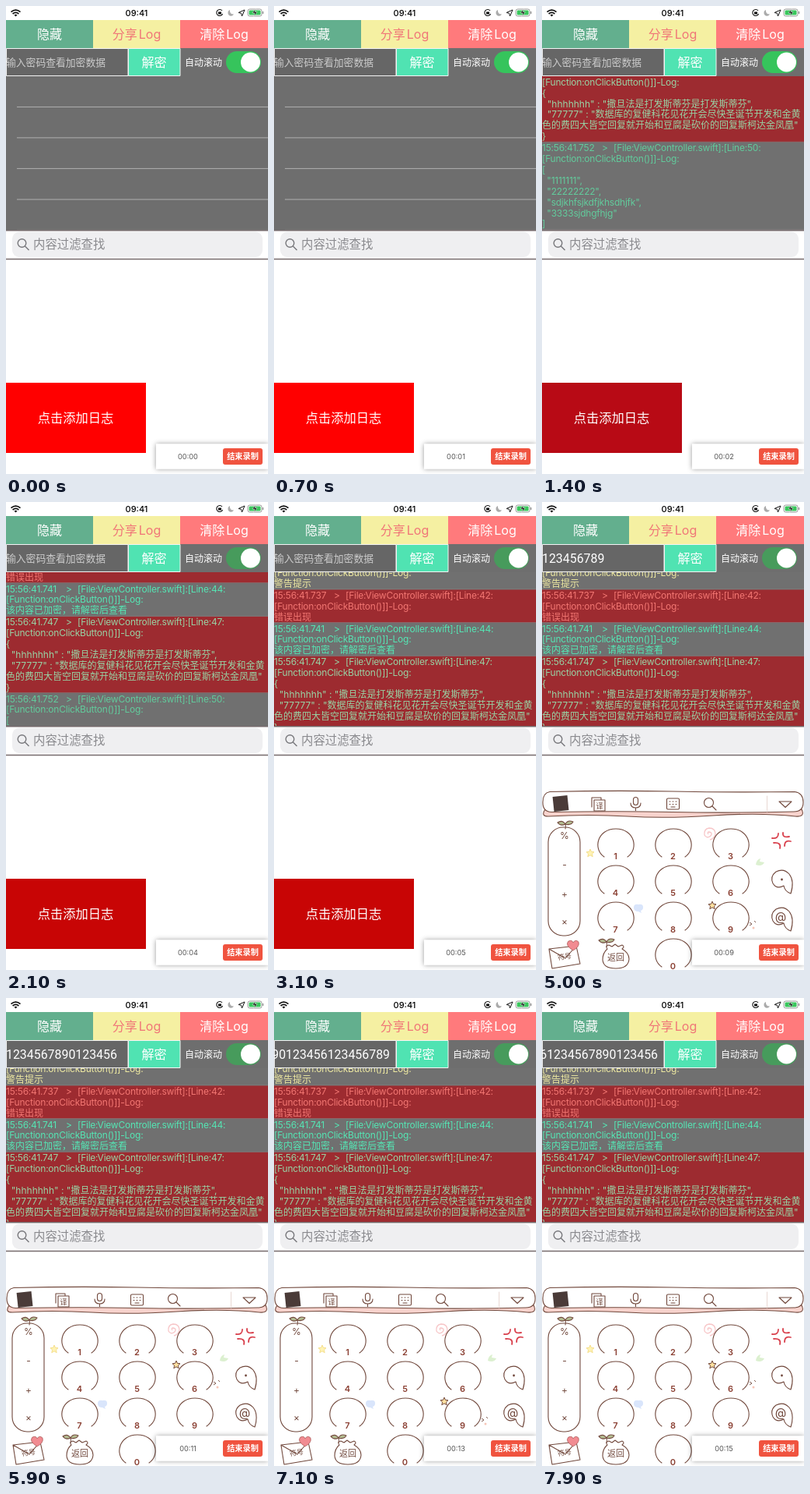
These frames come from a looping animation (337 px wide and 600 px high, 8000 ms). An HTML page:

```html
<!DOCTYPE html>
<html lang="zh-CN">
<head>
<meta charset="utf-8">
<style>
html, body { margin: 0; width: 100%; height: 100%; overflow: hidden; background: #fff; }
svg { display: block; width: 100vw; height: 100vh; }
text { font-family: Inter, "Noto Sans CJK SC", "Noto Sans CJK", sans-serif; white-space: pre; }
.mid { text-anchor: middle; }
.line { fill: none; stroke: #71483c; stroke-width: 1.1; stroke-linecap: round; stroke-linejoin: round; }
.ink { fill: #71483c; }
</style>
</head>
<body>
<svg viewBox="0 0 337 600">
  <defs>
    <clipPath id="fieldClip"><rect y="55" width="156" height="34"/></clipPath>
    <clipPath id="tableClip"><rect y="90" width="337" height="197"/></clipPath>
    <filter id="shadow" x="-10%" y="-30%" width="120%" height="160%">
      <feDropShadow dx="0" dy="0" stdDeviation="3" flood-opacity=".4"/>
    </filter>
    <g id="sprout" class="line">
      <path d="M0 5Q1 1 0-1"/>
      <path d="M0-1Q-4-7-10-3Q-6 2 0-1Q3-7 10-4Q7 1 0-1" fill="#b4bd92"/>
    </g>
    <path id="star" d="M0-5L1.5-1.6 5-1.3 2.4 1.1 3.2 4.7 0 2.8-3.2 4.7-2.4 1.1-5-1.3-1.5-1.6Z"/>
  </defs>

  <!-- status bar -->
  <g fill="none" stroke="#111" stroke-width="1.7">
    <path d="M6.5 7.6Q12.5 2.6 18.5 7.6M8.6 10Q12.5 6.8 16.4 10"/>
    <path d="M10.5 11.6Q12.5 10 14.5 11.6L12.5 13.6Z" fill="#111" stroke="none"/>
    <path d="M278 6A4 4 0 1 0 278.6 10" stroke-width="1.1"/>
    <rect x="273" y="7.5" width="4" height="3" fill="#111" stroke="none"/>
  </g>
  <path d="M288 5A4 4 0 1 0 293 10.5A4.4 4.4 0 0 1 288 5" fill="#aaa"/>
  <path d="M307 5L303.5 13 302.5 9.3 299 8.5Z" fill="none" stroke="#111"/>
  <rect x="311" y="4" width="18" height="9" rx="2.5" fill="#fff" stroke="#999"/>
  <rect x="312.5" y="5.5" width="15" height="6" rx="1.3" fill="#39c75c"/>
  <path d="M330.5 7v3" stroke="#999" stroke-width="1.5"/>
  <path d="M321 3.5L317 9h3l-1 4.5 4-6h-3Z" fill="#111" stroke="#fff" stroke-width=".5"/>
  <text class="mid" x="168" y="13" font-size="11" font-weight="500">09:41</text>

  <!-- top controls -->
  <path d="M0 18h112v36H0z" fill="#63af8e"/>
  <path d="M112 18h112v36H112z" fill="#f5f0a2"/>
  <path d="M224 18h113v36H224z" fill="#ff7a7c"/>
  <g class="mid" font-size="16">
    <text x="56" y="42" fill="#fff">隐藏</text>
    <text x="168" y="42" fill="#f07678">分享<tspan dx="2">Log</tspan></text>
    <text x="280.5" y="42" fill="#fff">清除<tspan dx="2">Log</tspan></text>
  </g>
  <path d="M0 54h337v234H0z" fill="#6e6e6e"/>
  <path d="M.5 54.5h156.5v35H.5z" fill="#666" stroke="#f4f4f4"/>
  <path d="M157.5 54.5h66.5v35h-66.5z" fill="#50e3b2" stroke="#f4f4f4"/>
  <text class="mid" x="190.5" y="78" font-size="16" fill="#fff">解密</text>
  <text x="230" y="76.5" font-size="12" fill="#fff">自动滚动</text>
  <rect id="switch" x="283" y="58" width="45" height="28" rx="14"/>
  <circle cx="314.5" cy="72" r="12.5" fill="#fff"/>
  <g clip-path="url(#fieldClip)">
    <text id="hint" y="76.7" font-size="12.8" fill="#ccc">输入密码查看加密数据</text>
    <text id="typed" y="77.5" font-size="15.9" fill="#fff" style="font-family:Roboto,sans-serif"></text>
  </g>

  <!-- log table -->
  <path id="rules" d="M14 129.4h323M14 168.9h323M14 208.4h323M14 248h323M14 287.4h323" stroke="#b0b0b0"/>
  <g clip-path="url(#tableClip)"><g id="log"></g></g>

  <!-- search bar -->
  <path d="M0 288h337v37H0z" fill="#fff"/>
  <path d="M0 287.7h337M0 324.5h337" stroke="#756a6c" stroke-width="1.4"/>
  <rect x="8" y="289.5" width="322" height="32.5" rx="9" fill="#efeff1"/>
  <g fill="none" stroke="#77777b" stroke-width="1.4"><circle cx="20.5" cy="304" r="5.3"/><path d="M24.5 308l5 5"/></g>
  <text x="35" y="311" font-size="15.4" fill="#8a8a8e">内容过滤查找</text>

  <path id="add" d="M0 483h180v90H0z"/>
  <text class="mid" x="89.5" y="534" font-size="16.3" fill="#fff">点击添加日志</text>

  <!-- keyboard -->
  <g id="board">
    <path d="M0 326h337v274H0z" fill="#fff"/>
    <path class="line" style="fill:#f8d3cd" d="M4 394Q-2 403 8 403Q60 400 110 403T220 402T326 403Q339 404 334 394Z"/>
    <path class="line" style="fill:#fff" d="M10 371.5Q90 369.5 168 371T325 371.5Q336 373 336 385Q336 397 324 397Q240 399 168 397.5T12 397.5Q1 397 1 385Q1 373 10 371.5Z"/>
    <g id="words" font-size="16" fill="#71483c" class="mid">
      <text x="20" y="393">号</text><text x="71" y="393">点</text><text x="110" y="393">个</text>
      <text x="153" y="393">的</text><text x="194" y="393">元</text>
      <g class="line"><circle cx="316.5" cy="387" r="7.5"/><path d="M313 383.5l7 7m0-7l-7 7"/></g>
    </g>
    <g id="tools" class="line">
      <rect x="14.5" y="377" width="19" height="19" fill="#4a3b38" stroke="none" transform="rotate(-6 24 386)"/>
      <path d="M64 391v-12h12v3M67 382h14v14H67z"/>
      <text class="ink mid" stroke="none" x="74" y="392.5" font-size="9.5">译</text>
      <rect x="117.5" y="378.5" width="6" height="10" rx="3"/>
      <path d="M114 386q0 6 6.5 6t6.5-6M120.5 392v3.5"/>
      <rect x="160.5" y="380" width="16" height="14" rx="1.5"/>
      <path d="M164 384h9M164 387.5h9" stroke-dasharray="1 3"/><path d="M166 391h5"/>
      <circle cx="214.5" cy="385.5" r="6"/><path d="M219 390l5 5"/>
      <path d="M289.5 377v20" stroke="#ead9d5"/><path d="M305 384h16l-8 7.5z"/>
    </g>
    <rect class="line" x="8" y="417" width="41" height="139" rx="19"/>
    <use href="#sprout" x="30" y="414"/>
    <g class="ink mid" font-size="12">
      <text x="29" y="432">%</text><text x="29" y="469">-</text><text x="29" y="507">+</text><text x="29" y="542">×</text>
    </g>
    <use href="#star" x="62" y="450" fill="#fff3b5" stroke="#f5df8c"/>
    <path d="M214 426q-2-3 1-3q5 1 2 5q-5 4-8-1q-1-8 6-9q8 0 8 8q-2 6-7 7" fill="none" stroke="#f7c5c7" stroke-width="1.3"/>
    <path d="M118 520q0-5 6-4q7-1 6 5q-1 3-3 3l1 3-4-2q-6 0-6-5" fill="#d9e5fb"/>
    <path d="M275 465q1-7 6-8l-1 4 6 1q-3 6-11 3" fill="#dcf0d0"/>
    <g id="keys"></g>
    <g id="spark">
      <use href="#star" x="-24" y="-15" fill="#ffe0a0" stroke="#71483c"/>
      <path d="M24 7l3 2-3 2m6-6l2 2" fill="none" stroke="#71483c" stroke-width=".9"/>
      <circle cx="29" cy="14" r="1.5" fill="#f6c6b8"/>
    </g>
    <g fill="none" stroke="#d9434f" stroke-width="1.8" stroke-linecap="round">
      <path d="M296 431q8 1 8-6M310 424q-1 7 8 5M320 435q-8-2-8 6M306 444q2-8-8-7"/>
    </g>
    <path id="tail" class="line" d="M320 502Q325 486 318 477Q311 469 301 474Q293 480 297 489Q302 497 311 492Q312 499 320 502"/>
    <use href="#tail" y="48"/>
    <circle class="ink" cx="308.5" cy="484" r="1.4"/>
    <text class="ink mid" x="307" y="537" font-size="15">@</text>
    <path class="line" d="M9 573l35-4 5 23-36 6zM9 573l21 12 14-16"/>
    <path d="M40 575q-11-7-6-12q5-2 6 2q3-5 7-1q2 6-7 11" fill="#f18b91" stroke="#a5524f" stroke-width=".7"/>
    <text class="ink mid" x="29" y="586" font-size="9" transform="rotate(-8 29 583)">符号</text>
    <path class="line" d="M84 573q-3-4 2-5l4 2 4-3 4 3 5-2q4 2 0 5q9 5 9 13q-1 12-17 12t-17-11q0-9 6-14z"/>
    <use href="#sprout" x="83" y="565"/>
    <text class="ink mid" x="95" y="588" font-size="11">返回</text>
  </g>

  <!-- recorder -->
  <path d="M193 561.5h144v32H193z" fill="#fff" filter="url(#shadow)"/>
  <text id="clock" class="mid" x="234" y="581" font-size="9.2" fill="#555"></text>
  <rect x="279" y="567" width="51" height="21" rx="3" fill="#f0533f"/>
  <text class="mid" x="304.5" y="581.3" font-size="10.2" font-weight="700" fill="#fff">结束录制</text>
</svg>
<script>
const $ = id => document.getElementById(id);
const clamp = v => Math.max(0, Math.min(1, v));
const ease = (t, from, to) => 1 - (1 - clamp((t - from) / (to - from))) ** 3;
const show = (id, on) => $(id).setAttribute('display', on ? 'inline' : 'none');
const move = (id, x, y) => $(id).setAttribute('transform', `translate(${x} ${y})`);

const grey = '#707070', red = '#9d2b30', pitch = 13.9;
const entries = [
  ['733', 38, grey, '#eeeeee', ['普通日志']],
  ['735', 40, grey, '#f0eba2', ['警告提示']],
  ['737', 42, red, '#f27672', ['错误出现']],
  ['741', 44, grey, '#55e6b4', ['该内容已加密，请解密后查看']],
  ['747', 47, red, '#98d3a5', ['{', '  "hhhhhhh" : "撒旦法是打发斯蒂芬是打发斯蒂芬",',
    '  "77777" : "数据库的复健科花见花开会尽快圣诞节开发和金黄',
    '色的费四大皆空回复就开始和豆腐是砍价的回复斯柯达金凤凰"', '}']],
  ['752', 50, grey, '#62cb9c', ['[', '  "1111111",', '  "22222222",', '  "sdjkhfsjkdfjkhsdhjfk",', '  "3333sjdhgfhjg"', ']']]
];

let logHeight = 0, rows = '';
const write = (s, x, y) =>
  `<text x="${x}" y="${y}" letter-spacing="${/[一-龥]/.test(s) ? 0 : -.23}">${s}</text>`;
for (const [ms, line, back, ink, body] of entries) {
  const height = (body.length + 2) * pitch + 1;
  const base = logHeight + 11.4;
  rows += `<rect y="${logHeight}" width="337" height="${height}" fill="${back}"/>
    <path d="M0 ${logHeight + height - .5}h337" stroke="#858080" stroke-width=".8"/><g font-size="12" fill="${ink}">`
    + write('15:56:41.' + ms, 0, base) + write('&gt;', 77, base)
    + write(`[File:ViewController.swift]:[Line:${line}:`, 92, base);
  ['[Function:onClickButton()]]-Log:', ...body].forEach((s, i) => rows += write(s, 0, base + (i + 1) * pitch));
  rows += '</g>';
  logHeight += height;
}
$('log').innerHTML = rows;
const maxScroll = logHeight - 197;

const keyAt = d => d ? [95 + (d - 1) % 3 * 74, 438 + Math.floor((d - 1) / 3) * 47] : [169, 579];
$('keys').innerHTML = [...Array(10).keys()].map(d => {
  const [x, y] = keyAt(d);
  return `<path class="line" style="fill:#fff" d="M${x - 15} ${y + 17}C${x - 30} ${y + 7} ${x - 24} ${y - 19} ${x} ${y - 19}S${x + 30} ${y + 7} ${x + 15} ${y + 17}"/>
    <text class="mid" x="${x - .5}" y="${y + 20}" font-size="11" font-weight="600" fill="#8a3f32">${d}</text>`;
}).join('');

const digits = '12345678901234561234567890123456';
const pace = [[3900, 0], [4200, 2.9], [5900, 16.1], [7100, 25.1], [7900, 32.1]];
function typedAt(t) {
  let n = 0;
  for (let i = 1; i < pace.length; i++) {
    const [a, p] = pace[i - 1], [b, q] = pace[i];
    if (t >= a) n = p + (q - p) * clamp((t - a) / (b - a));
  }
  return n;
}

function draw(t) {
  const n = typedAt(t), count = Math.floor(n);
  const pressed = Math.min(digits.length, Math.round(n));

  show('log', t >= 900);
  show('rules', t < 900);
  move('log', 0, 90 - maxScroll * ease(t, 950, 1300) + (maxScroll - 63) * ease(t, 1900, 2700));
  $('add').setAttribute('fill', t < 900 ? '#ff0000' : t < 2000 ? '#b80a15' : '#c80505');
  $('switch').setAttribute('fill', t < 2000 ? '#36c45c' : '#479b5c');

  show('hint', !count);
  $('typed').textContent = digits.slice(0, count);
  $('typed').setAttribute('x', Math.min(0, 149 - count * 8.93));

  show('board', t >= 3450);
  move('board', 0, 274 * (1 - ease(t, 3450, 3800)));
  const suggesting = count > 0 && count < 8;
  show('words', suggesting);
  show('tools', !suggesting);
  show('spark', pressed > 0);
  if (pressed) move('spark', ...keyAt(+digits[pressed - 1]));

  $('clock').textContent = '00:' + String(Math.floor(t * .00191)).padStart(2, '0');
}

const start = performance.now();
function tick() {
  draw((performance.now() - start) % 8000);
  requestAnimationFrame(tick);
}
tick();
</script>
</body>
</html>
```
